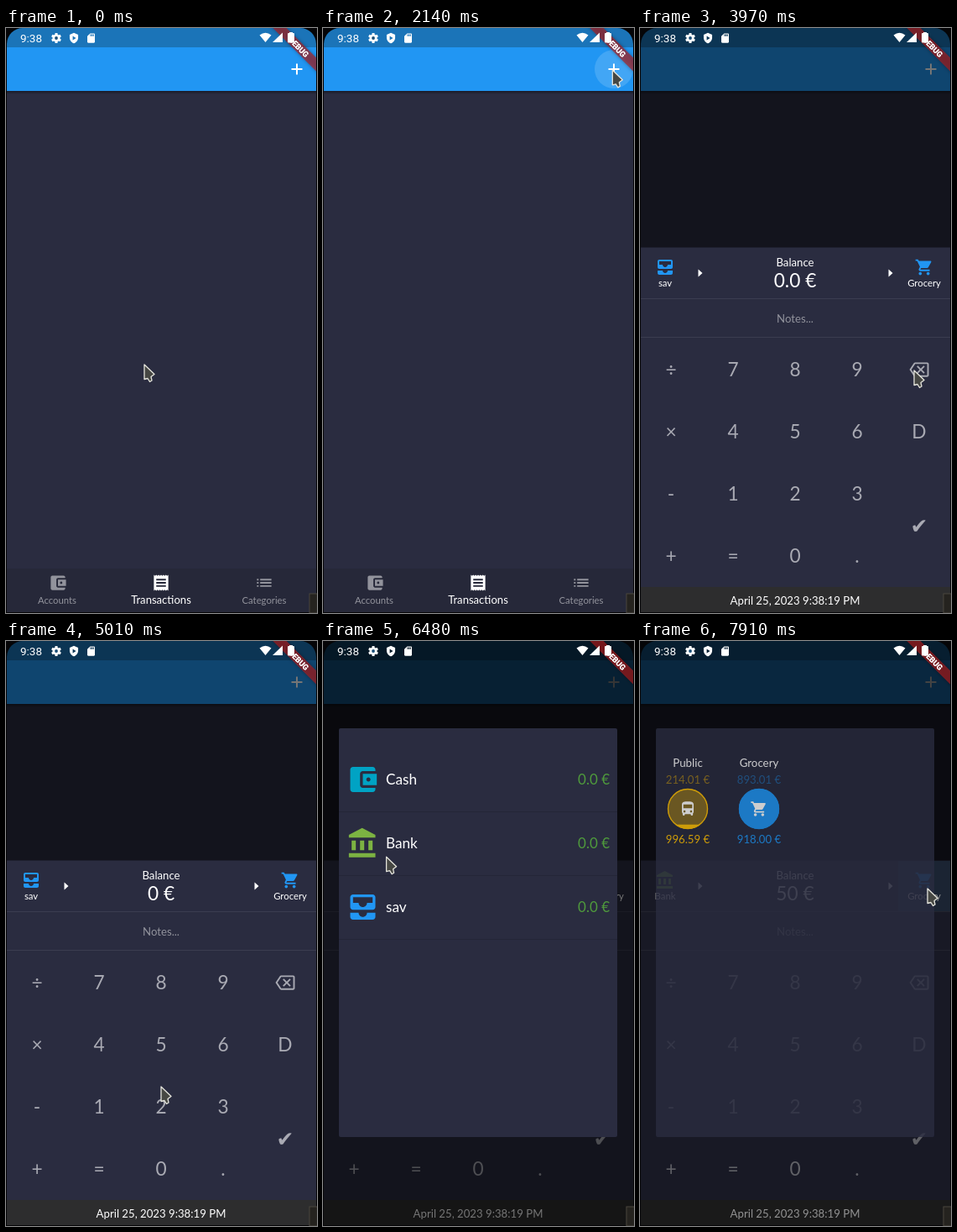
Recreate the animation shown at these times as an HTML page with a canvas. Size 371 by 697 pixels, loop 7990 ms.

```html
<!DOCTYPE html>
<html lang="en">
<head>
<meta charset="utf-8">
<title>Budget app</title>
<style>
html, body { margin: 0; width: 100%; height: 100%; overflow: hidden; background: #000; }
canvas { display: block; width: 371px; height: 697px; }
</style>
</head>
<body>
<canvas id="stage"></canvas>
<script>
const W = 371, H = 697, LOOP = 7990;
const canvas = document.getElementById('stage');
const ctx = canvas.getContext('2d');
const dpr = window.devicePixelRatio || 1;
canvas.width = W * dpr;
canvas.height = H * dpr;

const PANEL = '#2a2c40', BLUE = '#2196f3', GREEN = '#7cb342', AMBER = '#ffc107', KEY = '#a9aab3';

// Icons on a 24 unit grid
const ICONS = {
  wallet: 'M21 18v1c0 1.1-.9 2-2 2H5c-1.11 0-2-.9-2-2V5c0-1.1.89-2 2-2h14c1.1 0 2 .9 2 2v1h-9c-1.11 0-2 .9-2 2v8c0 1.1.89 2 2 2h9zm-9-2h10V8H12v8zm4-2.5c-.83 0-1.5-.67-1.5-1.5s.67-1.5 1.5-1.5 1.5.67 1.5 1.5-.67 1.5-1.5 1.5z',
  receipt: 'M18 17H6v-2h12v2zm0-4H6v-2h12v2zm0-4H6V7h12v2zM3 22l1.5-1.5L6 22l1.5-1.5L9 22l1.5-1.5L12 22l1.5-1.5L15 22l1.5-1.5L18 22l1.5-1.5L21 22V2l-1.5 1.5L18 2l-1.5 1.5L15 2l-1.5 1.5L12 2l-1.5 1.5L9 2 7.5 3.5 6 2 4.5 3.5 3 2v20z',
  list: 'M3 13h2v-2H3v2zm0 4h2v-2H3v2zm0-8h2V7H3v2zm4 4h14v-2H7v2zm0 4h14v-2H7v2zM7 7v2h14V7H7z',
  cart: 'M7 18c-1.1 0-1.99.9-1.99 2S5.9 22 7 22s2-.9 2-2-.9-2-2-2zM1 2v2h2l3.6 7.59-1.35 2.45c-.16.28-.25.61-.25.96 0 1.1.9 2 2 2h12v-2H7.42c-.14 0-.25-.11-.25-.25l.03-.12.9-1.63h7.45c.75 0 1.41-.41 1.75-1.03l3.58-6.49c.08-.14.12-.31.12-.48 0-.55-.45-1-1-1H5.21l-.94-2H1zm16 16c-1.1 0-1.99.9-1.99 2s.89 2 1.99 2 2-.9 2-2-.9-2-2-2z',
  bank: 'M4 10v7h3v-7H4zm6 0v7h3v-7h-3zM2 22h19v-3H2v3zm14-12v7h3v-7h-3zm-4.5-9L2 6v2h19V6l-9.5-5z',
  inbox: 'M19 3H5c-1.1 0-2 .9-2 2v7c0 1.1.9 2 2 2h14c1.1 0 2-.9 2-2V5c0-1.1-.9-2-2-2zm0 6h-4c0 1.62-1.38 3-3 3s-3-1.38-3-3H5V5h14v4zm-4 7h6v3c0 1.1-.9 2-2 2H5c-1.1 0-2-.9-2-2v-3h6c0 1.66 1.34 3 3 3s3-1.34 3-3z',
  bus: 'M4 16c0 .88.39 1.67 1 2.22V20c0 .55.45 1 1 1h1c.55 0 1-.45 1-1v-1h8v1c0 .55.45 1 1 1h1c.55 0 1-.45 1-1v-1.78c.61-.55 1-1.34 1-2.22V6c0-3.5-3.58-4-8-4s-8 .5-8 4v10zm3.5 1c-.83 0-1.5-.67-1.5-1.5S6.67 14 7.5 14s1.5.67 1.5 1.5S8.33 17 7.5 17zm9 0c-.83 0-1.5-.67-1.5-1.5s.67-1.5 1.5-1.5 1.5.67 1.5 1.5-.67 1.5-1.5 1.5zm1.5-6H6V6h12v5z',
  erase: 'M22 3H7c-.69 0-1.23.35-1.59.88L0 12l5.41 8.11c.36.53.9.89 1.59.89h15c1.1 0 2-.9 2-2V5c0-1.1-.9-2-2-2zm0 16H7.07L2.4 12l4.66-7H22v14zm-11.59-2L14 13.41 17.59 17 19 15.59 15.41 12 19 8.41 17.59 7 14 10.59 10.41 7 9 8.41 12.59 12 9 15.59z',
  shield: 'M12 1L3 5v6c0 5.55 3.84 10.74 9 12 5.16-1.26 9-6.45 9-12V5l-9-4zM9.5 7.5v9l7-4.5z',
  card: 'M18 2h-8L4 8v12c0 1.1.9 2 2 2h12c1.1 0 2-.9 2-2V4c0-1.1-.9-2-2-2zM12 8h-2V4h2v4zm3 0h-2V4h2v4zm3 0h-2V4h2v4z'
};
for (const k in ICONS) ICONS[k] = new Path2D(ICONS[k]);

// Pointer tip: time, x, y
const POINTER = [
  [0, 165, 401], [850, 283, 143], [1090, 341, 50], [1480, 341, 50], [1490, 346, 51],
  [2470, 345, 50], [2632, 345, 50], [2866, 180, 300], [3022, 125, 380], [3178, 106, 420],
  [3490, 145, 438], [3570, 200, 446], [3813, 327, 408], [4458, 327, 408], [4850, 188, 525],
  [5010, 185, 531], [5088, 188, 490], [5244, 188, 490], [5400, 185, 640], [5478, 185, 640],
  [5790, 36, 294], [5940, 34, 290], [6174, 34, 290], [6564, 86, 249], [6720, 87, 247],
  [7128, 87, 247], [7594, 340, 292], [7750, 343, 295], [LOOP, 343, 295]
];

// Bursts of screen updates: first, last, count
const UPDATES = [
  [80, 850, 11], [940, 1090, 3], [1490], [1650], [1980], [2140], [2470],
  [2710, 3490, 11], [3570, 4300, 10], [4380, 4850, 7], [5010, 5790, 11],
  [5940, 6720, 11], [7050, 7750, 10], [7910]
];

function held(t) {
  let h = 0;
  for (const [a, b = a, n = 1] of UPDATES) {
    if (t < a) break;
    const step = n > 1 ? (b - a) / (n - 1) : 1;
    h = a + Math.min(n - 1, Math.floor((t - a) / step + 0.15)) * step;
  }
  return h;
}

const ramp = (t, a, b) => Math.max(0, Math.min(1, (t - a) / (b - a)));
const within = (t, a, b) => t >= a && t < b;

function rect(x, y, w, h, color) {
  ctx.fillStyle = color;
  ctx.fillRect(x, y, w, h);
}

function disc(x, y, r, color) {
  ctx.fillStyle = color;
  ctx.beginPath();
  ctx.arc(x, y, r, 0, Math.PI * 2);
  ctx.fill();
}

function poly(color, ...p) {
  ctx.beginPath();
  for (let i = 0; i < p.length; i += 2) ctx.lineTo(p[i], p[i + 1]);
  ctx.closePath();
  ctx.fillStyle = color;
  ctx.fill();
}

// Text placed by the middle of its capitals
function text(s, x, y, size, color, align = 'center', font = 'Lato, sans-serif') {
  ctx.font = size + 'px ' + font;
  ctx.textAlign = align;
  ctx.fillStyle = color;
  ctx.fillText(s, x, y + size * 0.36);
}

function icon(name, x, y, size, color) {
  ctx.save();
  ctx.translate(x - size / 2, y - size / 2);
  ctx.scale(size / 24, size / 24);
  ctx.fillStyle = color;
  ctx.fill(ICONS[name], 'evenodd');
  ctx.restore();
}

function drawHome(t) {
  rect(0, 0, W, H, PANEL);
  const shade = ctx.createLinearGradient(0, 75, 0, 79);
  shade.addColorStop(0, 'rgba(0,0,0,.4)');
  shade.addColorStop(1, 'rgba(0,0,0,0)');
  rect(0, 75, W, 4, shade);
  rect(0, 0, W, 75, BLUE);
  rect(0, 0, W, 23, '#1b74b8');
  if (within(t, 2140, 2470)) disc(347, 49, 23, 'rgba(255,255,255,.15)');
  rect(340.5, 48, 13, 2, '#fff');
  rect(346, 42.5, 2, 13, '#fff');
  rect(0, 644, W, 53, '#262839');
  icon('wallet', 62, 661, 23, '#92939c');
  icon('receipt', 185, 661, 23, '#fff');
  icon('list', 308, 661, 23, '#92939c');
  text('Accounts', 61, 682, 11.3, '#92939c');
  text('Transactions', 185, 681, 13.1, '#fff');
  text('Categories', 308, 682, 11.3, '#92939c');
}

const ROWS = ['÷789', '×456D', '-123', '+=0.'];

function amount(t) {
  if (t < 4130) return '0.0 €';
  if (t < 4450) return '0. €';
  if (t < 5240) return '0 €';
  return t < 5470 ? '5 €' : '50 €';
}

function drawSheet(t) {
  const press = (a, b, x, y, w, h) => within(t, a, b) && rect(x, y, w, h, 'rgba(255,255,255,.08)');
  rect(0, 0, W, H, 'rgba(0,0,0,.54)');
  rect(0, 261.5, W, H, PANEL);
  rect(0, 322, W, 1, '#3b3d50');
  rect(0, 368, W, 1, '#3b3d50');
  rect(0, 666, W, 31, '#2d2d2e');

  press(4050, 4215, 296, 370, 74, 74);
  press(4380, 4530, 296, 370, 74, 74);
  press(5160, 5320, 148, 444, 74, 74);
  press(5400, 5550, 148, 592, 74, 74);
  press(6090, 6250, 0, 262, 62, 60);
  if (t >= 7740) rect(308, 262, 62, 60, 'rgba(80,160,220,.16)');

  const toBank = t >= 7050;
  icon(toBank ? 'bank' : 'inbox', 30, 285, 24, toBank ? GREEN : BLUE);
  text(toBank ? 'Bank' : 'sav', 30, 303.5, 11.3, '#fff');
  icon('cart', 339, 285, 22.5, BLUE);
  text('Grocery', 339, 303.5, 11.3, '#fff');
  for (const x of [69.5, 296.5]) poly('#fff', x, 287.5, x + 5, 292, x, 296.5);

  text('Balance', 185, 279, 13.2, '#fff');
  text(amount(t), 185, 301, 22.7, '#fff');
  text('Notes...', 185, 346, 13.2, '#93949d');
  ROWS.forEach((row, r) => [...row].forEach((ch, c) =>
    text(ch, 37 + c * 74, 407 + r * 74, 22.7, KEY)));
  icon('erase', 333, 407, 23, KEY);
  text('✔', 333, 593, 25, KEY, 'center', '"DejaVu Sans", sans-serif');
  text('April 25, 2023 9:38:19 PM', 185, 682, 13.2, '#fff');
}

// Content is blended as one layer: each paint uses the same alpha
const layer = document.createElement('canvas');
layer.width = canvas.width;
layer.height = canvas.height;
const layerCtx = layer.getContext('2d');

function drawAccounts() {
  const rows = [['wallet', 'Cash', '#00a3c4'], ['bank', 'Bank', GREEN], ['inbox', 'sav', BLUE]];
  rows.forEach(([name, label, color], i) => {
    const y = 165 + i * 76;
    rect(19, y + 38, 332, 1, '#242637');
    icon(name, 47.5, y, 40, color);
    text(label, 75, y, 17.2, '#fff', 'left');
    text('0.0 €', 342, y, 17, '#4f9a3c', 'right');
  });
}

function drawCategory(x, label, top, bottom, color, name, level) {
  text(label, x, 145, 13.3, '#fff');
  ctx.globalAlpha = 0.5;
  text(top, x, 165, 13.2, color);
  ctx.globalAlpha = 0.42;
  disc(x, 200, 24, color);
  ctx.globalAlpha = 1;
  ctx.save();
  ctx.beginPath();
  ctx.arc(x, 200, 24, 0, Math.PI * 2);
  ctx.clip();
  rect(x - 24, 224 - level * 48, 48, 48, color);
  ctx.restore();
  ctx.strokeStyle = color;
  ctx.lineWidth = 1.4;
  ctx.beginPath();
  ctx.arc(x, 200, 23.5, 0, Math.PI * 2);
  ctx.stroke();
  icon(name, x, 200, 21, '#fff');
  text(bottom, x, 236, 13.2, color);
}

function drawCategories() {
  drawCategory(57, 'Public', '214.01 €', '996.59 €', AMBER, 'bus', 0.11);
  drawCategory(142, 'Grocery', '893.01 €', '918.00 €', BLUE, 'cart', 1);
}

function drawDialog(alpha, content) {
  if (alpha <= 0) return;
  rect(0, 0, W, H, `rgba(0,0,0,${0.54 * alpha})`);
  layerCtx.setTransform(1, 0, 0, 1, 0, 0);
  layerCtx.clearRect(0, 0, layer.width, layer.height);
  // Snapshot what lies below, paint the dialog opaque, then mix both
  layerCtx.drawImage(canvas, 0, 0);
  ctx.beginPath();
  ctx.roundRect(19, 104, 332, 487, 2);
  ctx.fillStyle = PANEL;
  ctx.fill();
  content();
  ctx.globalAlpha = 1 - alpha;
  ctx.drawImage(layer, 0, 0, W, H);
  ctx.globalAlpha = 1;
}

function drawBanner() {
  ctx.save();
  ctx.translate(371, 1);
  ctx.rotate(Math.PI / 4);
  ctx.shadowColor = 'rgba(0,0,0,.5)';
  ctx.shadowBlur = 4 * dpr;
  rect(-60, 25, 120, 11.5, 'rgba(183,28,28,.63)');
  ctx.shadowBlur = 0;
  text('DEBUG', 0, 30.8, 9.2, '#fff', 'center', 'Roboto, sans-serif');
  ctx.font = '900 9.2px Roboto, sans-serif';
  ctx.fillText('DEBUG', 0, 30.8 + 3.3);
  ctx.restore();
}

function drawStatus() {
  text('9:38', 17, 12, 13.5, '#fff', 'left', 'Roboto, sans-serif');
  ctx.save();
  ctx.translate(60, 12);
  for (let i = 0; i < 3; i++) {
    rect(-1.5, -6, 3, 12, '#fff');
    ctx.rotate(Math.PI / 3);
  }
  ctx.strokeStyle = '#fff';
  ctx.lineWidth = 2.5;
  ctx.beginPath();
  ctx.arc(0, 0, 3.3, 0, Math.PI * 2);
  ctx.stroke();
  ctx.restore();
  disc(60, 12, 1.9, '#1b4f78');
  icon('shield', 81, 12, 13.5, '#fff');
  icon('card', 101.5, 12, 13.5, '#fff');

  ctx.fillStyle = '#fff';
  ctx.beginPath();
  ctx.moveTo(309.5, 17);
  ctx.lineTo(302.5, 8.5);
  ctx.quadraticCurveTo(309.5, 3, 316.5, 8.5);
  ctx.fill();
  poly('#fff', 318, 17, 330, 17, 330, 5.5);
  rect(338, 5, 4, 2, '#fff');
  ctx.beginPath();
  ctx.roundRect(336, 6, 8, 11.5, 1);
  ctx.fillStyle = '#fff';
  ctx.fill();
}

function drawFrame() {
  // Black surround with rounded top corners
  ctx.beginPath();
  ctx.rect(0, 0, W, H);
  ctx.roundRect(1, 0, 369, 696, [19, 19, 0, 0]);
  ctx.fillStyle = '#050507';
  ctx.fill('evenodd');
  rect(361.5, 673.5, 10, 24, '#4a473e');
  rect(362.5, 674.5, 9, 22, '#25231f');
}

function drawPointer(t) {
  let i = 1;
  while (i < POINTER.length - 1 && POINTER[i][0] < t) i++;
  const [t0, x0, y0] = POINTER[i - 1], [t1, x1, y1] = POINTER[i];
  const k = ramp(t, t0, t1);
  ctx.save();
  ctx.translate(x0 + (x1 - x0) * k, y0 + (y1 - y0) * k);
  poly('#464743', 0, 0, 0, 17.5, 4, 16.5, 6.5, 20.5, 9, 19, 8, 14.5, 12, 11.5);
  ctx.lineJoin = 'round';
  ctx.lineWidth = 1.3;
  ctx.strokeStyle = '#e4e4dc';
  ctx.stroke();
  ctx.restore();
}

function draw(time) {
  const t = held(time);
  ctx.setTransform(dpr, 0, 0, dpr, 0, 0);
  drawHome(t);
  if (t >= 2470) drawSheet(t);
  drawDialog(ramp(t, 6150, 6300) * (1 - ramp(t, 6930, 7080)), () => {
    if (t >= 6640) rect(19, 204, 332, 75, 'rgba(255,255,255,.06)');
    drawAccounts();
  });
  drawDialog(ramp(t, 7790, 7940), drawCategories);
  drawBanner();
  drawStatus();
  drawFrame();
  drawPointer(t);
}

function tick() {
  draw(performance.now() % LOOP);
  requestAnimationFrame(tick);
}
tick();
</script>
</body>
</html>
```
